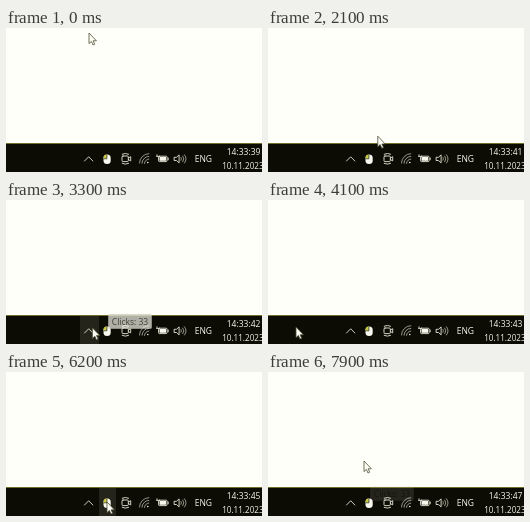
Write an HTML page that moves like this. It is 256x144 px and loops after 8000 ms.

```html
<!DOCTYPE html>
<html lang="en">
<head>
<meta charset="utf-8">
<title>Tray click counter</title>
<style>
  html, body { margin: 0; width: 100%; height: 100%; overflow: hidden; background: #fffffa; }
  svg { display: block; width: 100vw; height: 100vh; }
  text { font: 500 8.5px "Open Sans", "Noto Sans", sans-serif; fill: #f6f6ee; }
  .line { fill: none; stroke: #e6e6d6; stroke-width: .9; stroke-linecap: round; stroke-linejoin: round; }
  .dim { opacity: .7; }
  .fill { fill: #f8f8ee; }
  .hover { fill: #24241a; visibility: hidden; }
</style>
</head>
<body>
<svg viewBox="0 0 256 144">
  <rect width="256" height="144" fill="#fffffa"/>
  <rect y="115" width="256" height="29" fill="#0c0c04"/>
  <rect class="hover" id="hoverMore" x="74" y="115" width="19" height="29"/>
  <rect class="hover" id="hoverMouse" x="93" y="115" width="17" height="29"/>
  <rect y="115" width="256" height="1" fill="#70702c"/>

  <path class="line" d="M78.5 133l4.2-4.2 4.2 4.2"/>

  <g id="mouse">
    <rect class="fill" x="97.5" y="126.5" width="7.2" height="9.5" rx="3.5"/>
    <path d="M97.5 130.5v-.5a3.5 3.5 0 0 1 3.3-3.5v4z" fill="#c8c83c"/>
    <path d="M97.5 130.8h3.4v-4.3" fill="none" stroke="#1c1c0c" stroke-width=".7"/>
  </g>

  <g id="camera" class="line">
    <rect x="116" y="128" width="6.3" height="5.6" rx="1"/>
    <path d="M122.4 130l2.3-1.3v4.2l-2.3-1.3M116.2 126.2q3.2-1.6 6.4 0M116.2 135.4q3.2 1.6 6.4 0"/>
  </g>

  <g id="wifi">
    <path class="line dim" d="M133.5 135a9.3 9.3 0 0 1 9.3-9.3M136 135.2a6.8 6.8 0 0 1 6.8-6.8M138.5 135.4a4.3 4.3 0 0 1 4.3-4.3"/>
    <circle class="fill" cx="141.8" cy="134.5" r=".8"/>
  </g>

  <g id="battery">
    <rect class="line" x="152.5" y="128.2" width="8.6" height="5.4" rx="1"/>
    <rect class="fill" x="153.5" y="129" width="6.6" height="3.8"/>
    <path class="line" d="M162.2 130v1.8M151 126.8v1.2M150.6 128.4h2"/>
  </g>

  <g id="speaker" class="line">
    <path d="M168.5 129.3h2l2.6-2.4v8l-2.6-2.4h-2z"/>
    <path class="dim" d="M175 129.5q1 1.4 0 2.8M176.8 128.1q2.2 2.8 0 5.6M178.5 126.8q3.2 4.1 0 8.2"/>
  </g>

  <text x="188.7" y="134">ENG</text>
  <text id="clock" x="254.4" y="126.8" text-anchor="end"></text>
  <text x="216.2" y="141" style="font-size:8.1px">10.11.2023</text>

  <g id="tip">
    <rect x="102.5" y="114.5" width="43" height="14" rx="1" fill="#f4f4ea" stroke="#c6c6ba"/>
    <text x="105.8" y="124.5" style="fill:#55554c">Clicks: 33</text>
  </g>

  <path id="cursor" d="M0 0v10.6l2.4-2.2 1.6 3.6 1.7-.8-1.6-3.4h3.3z"
        fill="#fffff8" stroke="#4c4c34" stroke-width=".8" stroke-linejoin="round"/>
</svg>
<script>
  const LOOP = 8000, STEP = 100;
  const $ = id => document.getElementById(id);
  const clamp = v => Math.max(0, Math.min(1, v));

  // Each sweep runs straight to its end point, or bows sideways by a sine arc.
  const sweeps = [
    { from: 200, to: 900, x: 112, y: 87 },
    { from: 1000, to: 1200, x: 71, y: 52 },
    { from: 1400, to: 2260, x: 101, y: 128, bow: 28 },
    { from: 3100, to: 4100, x: 28, y: 127 },
    { from: 4100, to: 4900, x: 2, y: 97 },
    { from: 5000, to: 5750, x: 80, y: 131, bow: -22 },
    { from: 5900, to: 6200, x: 101, y: 130 },
    { from: 7200, to: 7900, x: 96, y: 89 }
  ];

  function cursorAt(t) {
    let x = 83, y = 5;
    for (const s of sweeps) {
      if (t <= s.from) break;
      const p = clamp((t - s.from) / (s.to - s.from));
      const dx = s.x - x, dy = s.y - y;
      const side = (s.bow || 0) * Math.sin(Math.PI * p) / Math.hypot(dx, dy);
      x += dx * p + dy * side;
      y += dy * p - dx * side;
    }
    return [x, y];
  }

  const fade = (t, from, to) => clamp(Math.min((t - from) / 500, (to - t) / 400));
  const show = (id, on) => $(id).style.visibility = on ? "visible" : "hidden";

  function draw(ms) {
    const t = Math.floor(ms % LOOP / STEP) * STEP;
    const [x, y] = cursorAt(t);
    $("cursor").setAttribute("transform", `translate(${x} ${y})`);
    $("tip").setAttribute("opacity", fade(t, 2500, 3580) + fade(t, 6400, 7940));
    $("clock").textContent = "14:33:" + (39 + Math.floor((t + 300) / 1000));
    show("hoverMore", y >= 115 && x >= 74 && x < 93);
    show("hoverMouse", y >= 115 && x >= 93 && x < 110);
  }

  const start = performance.now();
  function tick() {
    draw(performance.now() - start);
    requestAnimationFrame(tick);
  }
  tick();
</script>
</body>
</html>
```
